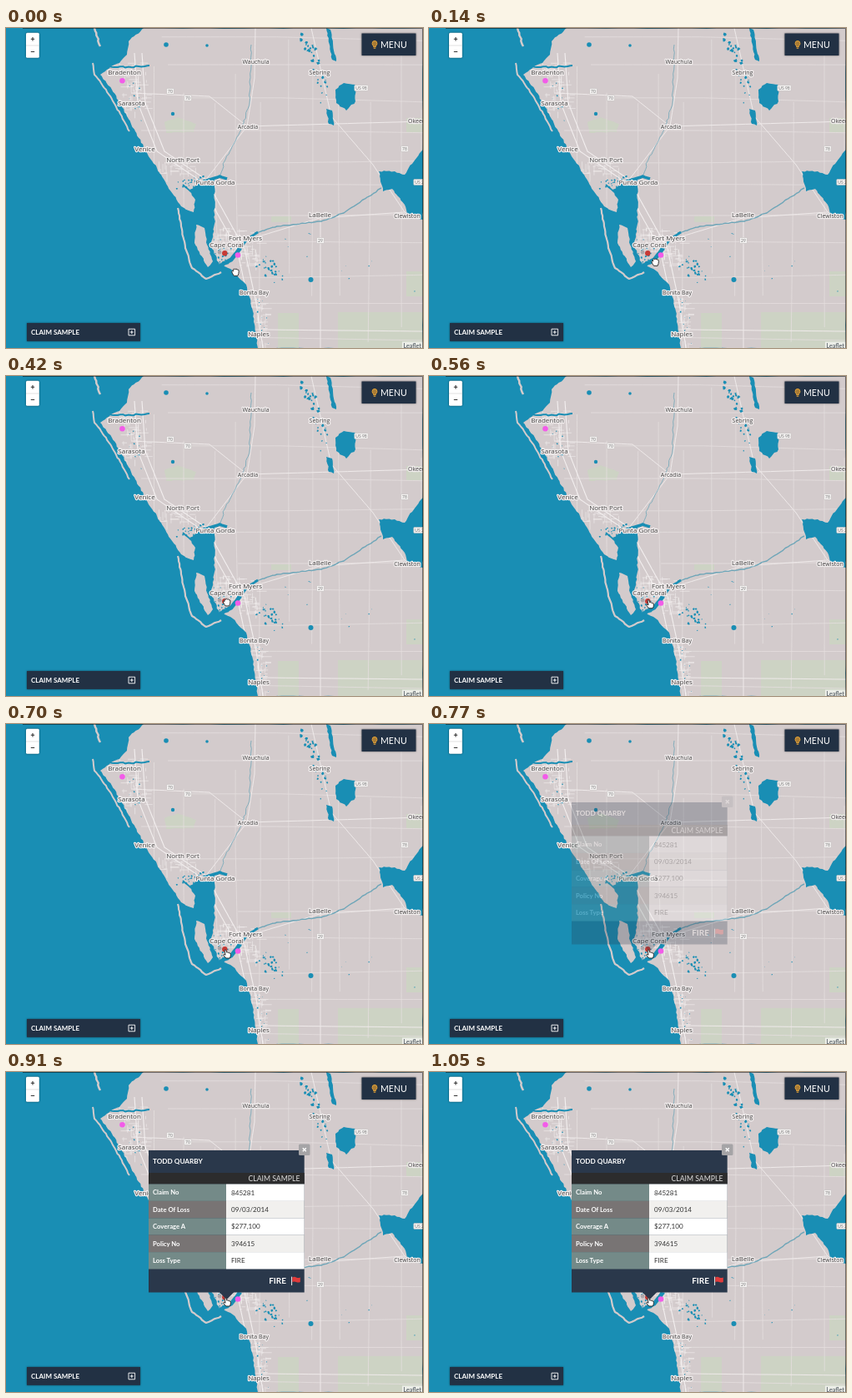
Write an HTML page that moves like this. It is 500 by 384 pixels and loops after 5670 ms.

```html
<!DOCTYPE html>
<html lang="en">
<head>
<meta charset="utf-8">
<title>Claims map</title>
<style>
html, body { margin: 0; width: 100%; height: 100%; overflow: hidden; background: #198eb4; }
svg { display: block; width: 100%; height: 100%; }
text { font-family: Lato, sans-serif; }
.place { font-family: "Open Sans", sans-serif; font-weight: 500; fill: #444242; stroke: #f1eded; stroke-width: 2.6; stroke-linejoin: round; paint-order: stroke; }
.mid { text-anchor: middle; }
.end { text-anchor: end; }
.b { font-weight: 700; }
.box { filter: drop-shadow(0 0 .8px rgba(0, 0, 0, .5)); }
</style>
</head>
<body>
<svg id="stage" viewBox="0 0 500 384">
  <rect width="500" height="384" fill="#198eb4"/>
  <g id="map"></g>
  <g id="ui"></g>
  <g id="popup"></g>
  <g id="hand" stroke="#222" stroke-width=".9" stroke-linejoin="round" fill="#fff">
    <path id="grab" d="M-3.6 1.8L-4.6-.6Q-4.2-2-2.9-1L-3-3.2Q-2-4.6-1.2-3.2Q-.4-5 .6-3.4Q1.8-4.4 2.3-2.8Q4-3.2 3.9-1.4L3.6 1.6 2.6 4.4H-2Z"/>
    <path id="point" d="M-3-4.6Q-2-5.8-1.1-4.5L-.3-1.8Q.8-2.7 1.4-1.6Q2.5-2.2 3-1Q4.3-1.2 4.4.3L4.2 2.8 3.2 5H-1.2L-4.2 1.6Q-4.4.1-2.8.6L-1.9 1.2Z"/>
  </g>
</svg>
<script>
const $ = id => document.getElementById(id);
const SEA = '#198eb4', RIVER = '#6fa6b8', LAND = '#d3cbcc', GREEN = '#cdd3c4', NAVY = '#223144';
const LOOP = 5670, STEP = 70, OPEN = 700, FADE = 210, POINT_AT = 560;

let seed = 41;
const rnd = () => (seed = (seed * 16807) % 2147483647) / 2147483647;
const jit = a => (rnd() * 2 - 1) * a;
const mix = (a, b, f) => a + (b - a) * f;
const repeat = (n, make) => Array.from({ length: n }, (_, i) => make(i)).join('');
const points = s => s.split(' ').map(p => p.split(',').map(Number));
const shift = (pts, dx, dy = 0) => pts.map(([x, y]) => [x + dx, y + dy]);

// Subdivides a polyline and nudges the new points, like a shoreline.
function rough(pts, amp, closed) {
  const p = closed ? [...pts, pts[0]] : pts, out = [];
  p.forEach(([x, y], i) => {
    out.push([x, y]);
    if (!p[i + 1]) return;
    const [u, v] = p[i + 1], n = Math.min(14, Math.floor(Math.hypot(u - x, v - y) / 3));
    for (let k = 1; k < n; k++) out.push([mix(x, u, k / n) + jit(amp), mix(y, v, k / n) + jit(amp)]);
  });
  return 'M' + out.map(q => q.map(c => c.toFixed(1)).join(' ')).join('L') + (closed ? 'Z' : '');
}
const area = (pts, fill, amp = .8) => `<path d="${rough(pts, amp, true)}" fill="${fill}"/>`;
const line = (pts, color, w, amp = 0) =>
  `<path d="${rough(pts, amp)}" fill="none" stroke="${color}" stroke-width="${w}" stroke-linejoin="round"/>`;
const rect = (x, y, w, h, fill, more = '') =>
  `<rect x="${x}" y="${y}" width="${w}" height="${h}" fill="${fill}" ${more}/>`;
const text = (x, y, size, str, fill, cls = '') =>
  `<text x="${x}" y="${y}" font-size="${size}" fill="${fill}" class="${cls}">${str}</text>`;
const dot = (x, y, r, fill) => `<circle cx="${x}" cy="${y}" r="${r}" fill="${fill}"/>`;
const place = (x, y, str, size = 8, anchor = 'mid') => text(x, y + size * .35, size, str, '', 'place ' + anchor);
const shield = (x, y, str) => {
  const w = 4 + str.length * 2.5;
  return rect(x - w / 2, y - 3.5, w, 7, '#f3f1f0', 'rx="1" stroke="#bbb5b5" stroke-width=".5"') +
    text(x, y + 1.9, 5, str, '#777', 'mid');
};

// A string of small lakes from one point to another.
const lakes = (x, y, u, v, n, spread, size) => repeat(n, () => {
  const f = rnd(), r = size * mix(.35, 1, rnd());
  const cx = mix(x, u, f) + jit(spread), cy = mix(y, v, f) + jit(spread);
  return area(Array.from({ length: 6 }, (_, k) =>
    [cx + r * Math.cos(k * Math.PI / 3) + jit(r / 3), cy + r * Math.sin(k * Math.PI / 3) + jit(r / 3)]), SEA, 0);
});
// Short streets, alternately across and along.
const streets = (cx, cy, rx, ry, n) => {
  const d = repeat(n, i => `M${cx + jit(rx)} ${cy + jit(ry)}${i % 2 ? 'h' : 'v'}${mix(3, 12, rnd())}`);
  return `<path d="${d}" fill="none" stroke="#f2eeee" stroke-width=".6"/>`;
};
// Country roads: a loose grid with one small bend each.
const countryRoads = () => repeat(11, i => {
  const x = 180 + i * 32 + jit(7), y = 16 + i * 35 + jit(8);
  const top = rnd() * 110, left = 150 + rnd() * 130, bend = jit(6);
  return line([[x, top], [x, 170 + jit(40)], [x + bend, 384 - rnd() * 120]], '#e5dfdf', .8) +
    line([[left, y], [330 + jit(40), y], [500, y + bend]], '#e5dfdf', .8);
});

function drawMap() {
  const gulf = points('113,56 127,74 144,103 155,124 168,148 181,168 194,190 210,214');
  const harbour = points('225,221 227,206 220,194 232,186 250,182 250,235 246,262 256,284');
  const beach = points('269,289 288,308 296,340 302,384');
  const north = points('500,384 500,0 165,0 147,16 145,32 136,42 126,46');
  const shore = rough([...north, ...gulf, ...harbour, ...beach], .8, true);

  const trunk = points('163,30 167,90 190,148 240,182 262,222 286,265 300,330 308,384');
  const highways = [
    '299,0 298,60 289,118 240,182', '366,0 390,106 440,164 478,221 500,228', '150,78 244,82 289,118 500,112',
    '377,226 377,384', '290,254 376,228 478,221', '308,362 500,364'
  ].map(s => line(points(s), '#efeaea', 1)).join('');
  const greens = rect(398, 341, 102, 43, GREEN) + rect(326, 342, 25, 42, GREEN) +
    rect(480, 108, 20, 17, GREEN) + rect(480, 292, 20, 30, GREEN) + rect(318, 226, 24, 7, GREEN) +
    area(points('190,113 206,107 228,115 225,125 192,126'), GREEN);
  const towns = streets(152, 72, 18, 30, 80) + streets(205, 168, 24, 9, 28) +
    streets(266, 254, 16, 16, 60) + streets(290, 265, 12, 20, 50) + streets(303, 350, 9, 30, 50);

  const isles = line([[106, 0], [113, 22]], LAND, 2.5, .8) +
    line([[104, 42], ...shift(gulf.slice(0, 4), -7)], LAND, 2, .5) +
    line(points('206,216 210,238 215,264 223,288 240,301 258,293'), LAND, 2.2, .7) +
    area(points('228,236 238,240 241,260 248,280 242,287 226,258'), LAND);
  const rivers = line(points('294,20 292,90 283,120 262,160 256,180'), RIVER, .8, .8) +
    line(points('298,246 325,238 378,232 405,222 450,192'), RIVER, 1.4, .6) +
    line(points('124,46 150,47 172,45'), SEA, 2, .8) + line(points('236,184 256,178 265,181'), SEA, 3.5, .7) +
    line(points('256,285 270,278 281,264'), SEA, 5, .8) + line(points('281,264 289,254 302,245'), SEA, 2.8, .5) +
    line(points('224,198 212,188'), SEA, 1.8, .8);
  const bigLakes =
    area(points('500,146 487,163 478,176 466,172 447,172 452,196 463,193 478,212 481,226 500,230'), SEA) +
    area(points('395,74 405,66 419,68 419,88 408,99 396,90'), SEA) +
    area(points('384,97 391,99 393,117 387,115'), SEA) + area(points('384,0 389,2 396,40 391,38'), SEA) +
    dot(192, 20, 2.8, SEA) + dot(200, 103, 2.2, SEA) + dot(241, 21, 1.8, SEA) + dot(365.5, 302, 3, SEA);
  const smallLakes = lakes(357, 4, 384, 84, 32, 7, 2.2) + lakes(150, 62, 160, 110, 12, 8, 1) +
    lakes(255, 258, 268, 282, 22, 8, 1.4) + lakes(304, 278, 328, 298, 26, 8, 1.6) +
    lakes(208, 188, 240, 184, 26, 6, 1.4) + lakes(300, 310, 312, 380, 12, 6, 1) +
    lakes(330, 250, 480, 330, 12, 25, .8);

  const names = [
    [142, 53, 'Bradenton'], [150.5, 90, 'Sarasota'], [166.5, 145, 'Venice'], [212, 158, 'North Port'],
    [251, 185, 'Punta Gorda'], [287, 252, 'Fort Myers'], [264.5, 260, 'Cape Coral'], [376.5, 224, 'LaBelle'],
    [303, 367, 'Naples'], [299.5, 41, 'Wauchula', 7], [376, 54, 'Sebring', 7], [290, 118.5, 'Arcadia', 7],
    [297.5, 318, 'Bonita Bay', 7], [481, 226, 'Clewiston', 7], [482, 112, 'Okeechobee', 7, '']
  ];
  const shields = [[197, 76, '70'], [218, 84, '70'], [426, 72, 'US 98'], [478, 145, '78'], [377, 255, '29'], [497, 185, 'US 27']];

  $('map').innerHTML = `<clipPath id="coast"><path d="${shore}"/></clipPath><path d="${shore}" fill="${LAND}"/>` +
    `<g clip-path="url(#coast)">${greens}${countryRoads()}${towns}${highways}` +
    [0, -9].map(dx => line(shift(trunk, dx), '#f3efef', 1.1)).join('') + '</g>' +
    isles + rivers + bigLakes + smallLakes +
    shields.map(s => shield(...s)).join('') + names.map(n => place(...n)).join('') +
    dot(139.5, 63.2, 3.3, '#f25ce8') + dot(278, 272.5, 3.3, '#f25ce8') +
    dot(256, 269, 2.4, '#aaa5a8') + dot(262.3, 270.2, 3.2, '#c63a35');
}

function drawUi() {
  $('ui').innerHTML = '<g class="box">' + rect(24, 5.8, 15.8, 30, '#fff', 'rx="1.5"') +
    rect(426.5, 6.5, 65, 26.5, NAVY) + rect(25, 354, 136, 21.8, NAVY) + '</g>' +
    rect(24, 20.7, 15.8, .6, '#ccc') +
    '<path d="M29.8 13.3h4.4M32 11.1v4.4M29.8 28.5h4.4" stroke="#333" stroke-width="1.1"/>' +
    '<path d="M440.6 21.6Q438.9 19.9 439.1 18.4A2.9 2.9 0 0 1 444.9 18.4Q445.1 19.9 443.4 21.6V22.6H440.6Z" fill="#a87b35" stroke="#e5a437"/>' +
    '<path d="M440.7 24.2h2.6" stroke="#e5a437" stroke-width="1.1"/>' +
    text(449, 24, 10.6, 'MENU', '#fff') + text(30, 367.8, 8, 'CLAIM SAMPLE', '#fff', 'b') +
    '<path d="M147 361.2h7.6v7.6h-7.6zM148.8 365h4M150.8 363v4" fill="none" stroke="#fff" stroke-width=".9"/>' +
    rect(475, 376.5, 25, 7.5, '#fff', 'opacity=".6"') + text(476.5, 384, 7.2, 'Leaflet', '#3d4650') +
    '<path d="M20 .5H499.5V384" fill="none" stroke="#000" stroke-opacity=".5"/>';
}

function drawPopup() {
  const rows = [['Claim No', '845281'], ['Date Of Loss', '09/03/2014'], ['Coverage A', '$277,100'],
    ['Policy No', '394615'], ['Loss Type', 'FIRE']];
  const top = 134.5, h = 20.4, navy = '#2a384b';
  $('popup').innerHTML =
    `<path d="M255.5 264h18l-9 9z" fill="${navy}"/>` +
    rect(171, 94, 186.7, 170.5, navy) + rect(171, 121, 186.7, 13.5, '#2c2c2d') +
    text(176, 110.3, 8.2, 'TODD QUARBY', '#fff', 'b') + text(352.5, 130.7, 8.7, 'CLAIM SAMPLE', '#ddd', 'end') +
    rows.map(([key, value], i) => {
      const y = top + i * h, odd = i % 2;
      return rect(171, y, 93, h, odd ? '#787474' : '#748a88') + rect(264, y, 93.7, h, odd ? '#f1f0ee' : '#fff') +
        text(176, y + 12.9, 7.7, key, '#fff', 'b') + text(270, y + 13, 8.1, value, '#333');
    }).join('') +
    text(336, 254.4, 10, 'FIRE', '#fff', 'b end') +
    '<path d="M342.6 245.6v10.4" stroke="#eee"/>' +
    '<path d="M343.3 246.4q2.4-1.3 4.7 0t4.8 0v5.6q-2.4 1.2-4.8 0t-4.7 0z" fill="#e03b3b"/>' +
    rect(351, 86.5, 13.5, 13.5, '#a5a4a6', 'rx="1.5"') +
    '<path d="M355.8 91.3l4 4m0-4l-4 4" stroke="#fff" stroke-width="1.4"/>';
}

// Cursor stops: time, x, y.
const stops = [[0, 275.3, 293], [140, 271.5, 281], [420, 265, 271.5], [700, 265, 276]];
function cursorAt(t) {
  const i = stops.findIndex(s => s[0] > t);
  if (i < 0) return stops[stops.length - 1].slice(1);
  const a = stops[i - 1], b = stops[i], f = (t - a[0]) / (b[0] - a[0]);
  return [mix(a[1], b[1], f), mix(a[2], b[2], f)];
}
const smooth = f => f * f * (3 - 2 * f);
const clamp = f => Math.max(0, Math.min(1, f));

function render(ms) {
  const t = Math.floor((ms % LOOP) / STEP) * STEP, [x, y] = cursorAt(t);
  $('hand').setAttribute('transform', `translate(${x} ${y})`);
  $('grab').style.display = t < POINT_AT ? '' : 'none';
  $('point').style.display = t < POINT_AT ? 'none' : '';
  $('popup').setAttribute('opacity', smooth(clamp((t - OPEN) / FADE)));
}

drawMap();
drawUi();
drawPopup();
const start = performance.now();
(function tick() {
  render(Math.max(0, performance.now() - start));
  requestAnimationFrame(tick);
})();
</script>
</body>
</html>
```
